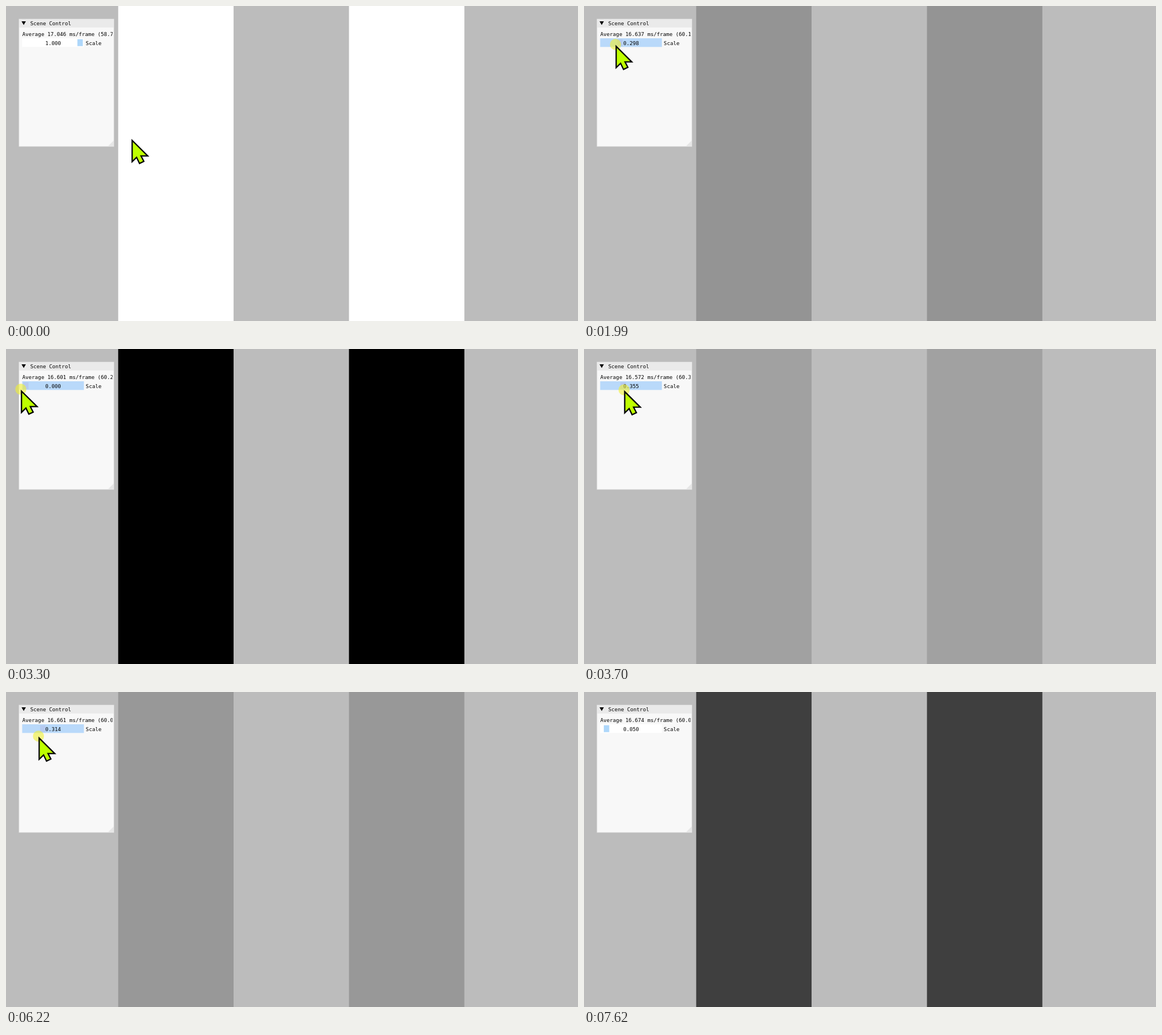
Write an HTML page with a canvas that moves like this. It is 1008 by 556 pixels and loops after 7720 ms.

```html
<!DOCTYPE html>
<html lang="en">
<head>
<meta charset="utf-8">
<title>Scene Control</title>
<style>
  html, body { margin: 0; width: 100%; height: 100%; overflow: hidden; background: #bcbcbc; }
  canvas { display: block; width: 1008px; height: 556px; }
</style>
</head>
<body>
<canvas id="stage" width="1008" height="556"></canvas>
<script>
const ctx = document.getElementById('stage').getContext('2d');
const LOOP = 7720, STEPS = 77;
const PRESS = 1080, RELEASE = 6800, LEAVE = 6850;

const clamp01 = v => Math.min(1, Math.max(0, v));
const mix = (a, b, k) => a + (b - a) * k;
const smooth = u => u * u * (3 - 2 * u);
const slowDown = u => 1 - (1 - u) ** 2;

const drags = [
  { start: 1200, end: 2940, to: 0, ease: slowDown },
  { start: 3498, end: 4000, to: 1, ease: smooth },
  { start: 5640, end: 6528, to: 0.05, ease: smooth }
];

// Readout of the average frame time: [time, ms]
const readings = [
  [0, 17.046], [1990, 16.637], [3300, 16.601], [3700, 16.572],
  [5000, 16.678], [6220, 16.661], [7620, 16.674]
];

const scaleAt = t => drags.reduce(
  (v, d) => mix(v, d.to, d.ease(clamp01((t - d.start) / (d.end - d.start)))), 1);

function frameMsAt(t) {
  const i = Math.max(1, readings.findIndex(r => r[0] >= t));
  const [[t0, a], [t1, b]] = t > 7620 ? readings.slice(-2) : readings.slice(i - 1, i + 1);
  return mix(a, b, clamp01((t - t0) / (t1 - t0)));
}

// While dragging, the pointer runs slightly ahead of the knob and drifts down.
function pointerAt(t) {
  const lead = 4.3 * Math.sign(scaleAt(t + 20) - scaleAt(t - 20));
  const dragX = Math.max(27.3, 27.3 + 113 * scaleAt(t) + lead);
  const dragY = 71.3 + (t - 1990) * 0.00237;
  const arrive = smooth(clamp01(t / 850));
  const away = Math.max(0, (t - LEAVE) / 370);
  return [
    mix(222.3, dragX, arrive) + 848 * away ** 2,
    mix(237.3, dragY, arrive) + 436 * away ** 1.3
  ];
}

// The picture advances about ten times a second, with small timing drift.
function stepStart(i) {
  return i * 100 + (i < 8 ? 0 : i < 28 ? -10 : i < 53 ? 0 : 20);
}

function snap(t) {
  let i = STEPS - 1;
  while (i > 0 && stepStart(i) > t) i--;
  return stepStart(i);
}

function rect(color, x, y, w, h) {
  ctx.fillStyle = color;
  ctx.fillRect(x, y, w, h);
}

function polygon(points, color) {
  ctx.beginPath();
  points.forEach(([x, y]) => ctx.lineTo(x, y));
  ctx.closePath();
  ctx.fillStyle = color;
  ctx.fill();
}

function text(str, x, y, align = 'left') {
  ctx.textAlign = align;
  ctx.fillStyle = '#000';
  ctx.fillText(str, x, y);
}

// Linear light to an sRGB gray.
function gray(linear) {
  const s = linear <= 0.0031308 ? linear * 12.92 : 1.055 * linear ** (1 / 2.4) - 0.055;
  const v = Math.round(s * 255);
  return `rgb(${v},${v},${v})`;
}

function drawStripes(value) {
  const width = 203.35;
  rect(gray(0.5), 0, 0, 1008, 556);
  for (const n of [0, 2]) rect(gray(value), 197.7 + n * width, 0, width, 556);
}

function drawSlider(value, held, hovered) {
  rect(held ? '#b9d9fa' : hovered ? '#d6e8fc' : '#fff', 28.5, 57, 108.8, 15.3);
  rect(held ? '#b5caf0' : '#aed7fa', 30.1 + 95.7 * value, 58.6, 9.6, 12.2);
  text(value.toFixed(3), 83, 68.5, 'center');
  text('Scale', 140.6, 68.5);
}

function drawPanel(t, value, held, hovered) {
  rect('#d8d8d8', 22.4, 22.6, 168.2, 225.8);
  rect('#f8f8f8', 23.2, 23.4, 166.6, 224.2);
  rect('#eaeaea', 23.2, 23.4, 166.6, 14.6);
  polygon([[189.8, 237.5], [189.8, 247.6], [179.7, 247.6]], '#e6e6e6');
  polygon([[27.4, 27], [35, 27], [31.2, 33.6]], '#000');

  ctx.font = '9.2px "DejaVu Sans Mono", monospace';
  text('Scene Control', 42.8, 33.5);
  ctx.save();
  ctx.beginPath();
  ctx.rect(23, 38, 164.8, 210);
  ctx.clip();
  const ms = frameMsAt(t);
  text(`Average ${ms.toFixed(3)} ms/frame (${(1000 / ms).toFixed(1)} FPS)`, 28.7, 52.6);
  drawSlider(value, held, hovered);
  ctx.restore();
}

function drawPointer(x, y, held) {
  if (held) {
    ctx.beginPath();
    ctx.arc(x - 1.2, y - 3.4, 9.8, 0, Math.PI * 2);
    ctx.fillStyle = 'rgba(240,240,50,0.6)';
    ctx.fill();
  }
  ctx.save();
  ctx.translate(x, y);
  polygon([[0, 0], [0, 37.5], [7.8, 29.8], [13, 40.6], [20.6, 37], [15.6, 27.3], [27.5, 27.3]], '#beff00');
  ctx.lineWidth = 2.3;
  ctx.strokeStyle = '#000';
  ctx.stroke();
  ctx.restore();
}

function draw(now) {
  const t = snap(now % LOOP);
  const value = scaleAt(t);
  const [x, y] = pointerAt(t);
  const held = t >= PRESS && t < RELEASE;
  const hovered = x > 28 && x < 141 && y > 57 && y < 75;
  drawStripes(value);
  drawPanel(t, value, held, hovered);
  drawPointer(x, y, held);
}

const start = performance.now();
function tick() {
  draw(performance.now() - start);
  requestAnimationFrame(tick);
}
tick();
</script>
</body>
</html>
```
